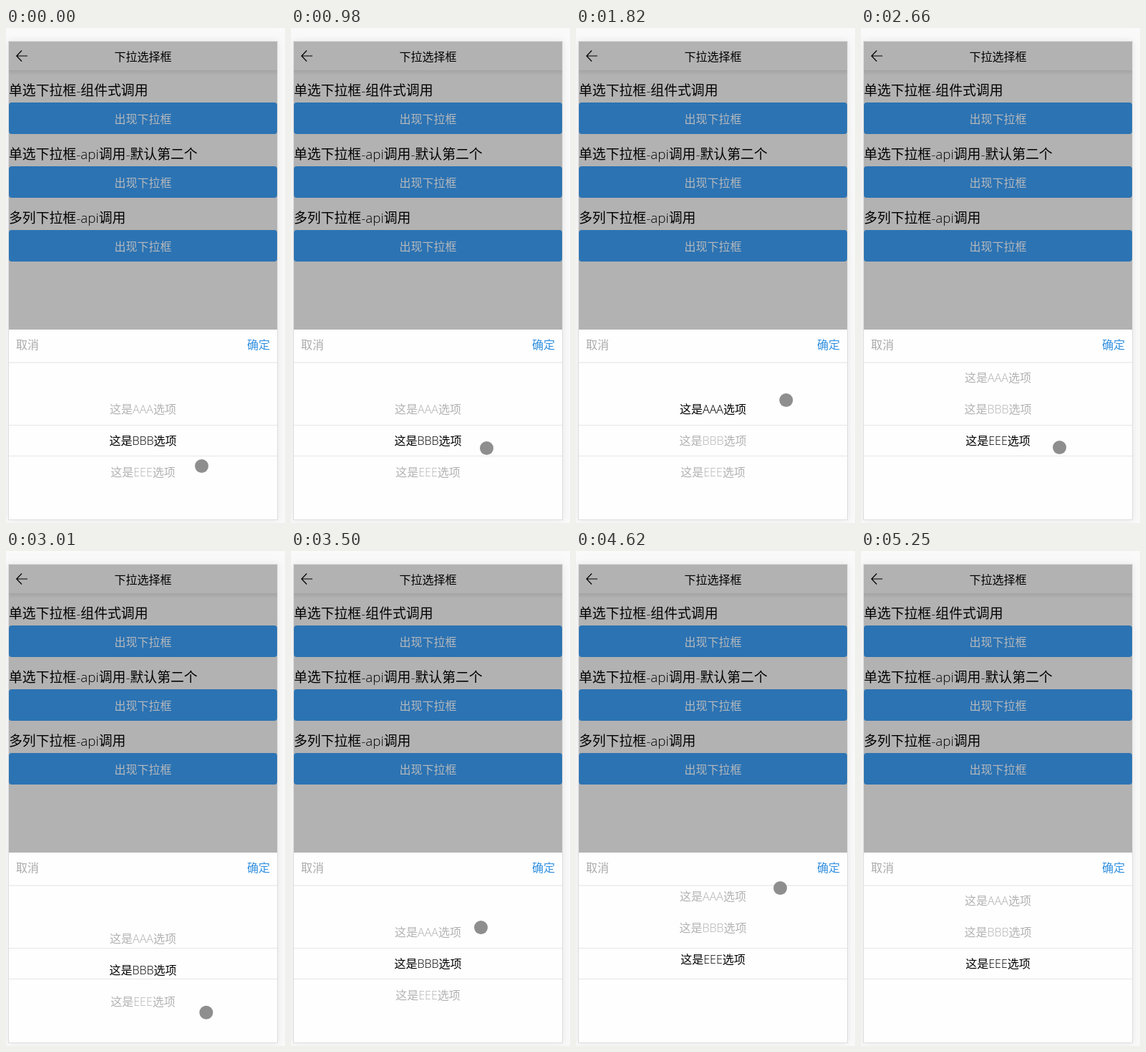
These frames come from a looping animation (390 by 691 pixels, 5.67 s). An HTML page with a canvas:

```html
<!DOCTYPE html>
<html lang="zh-CN">
<head>
<meta charset="utf-8">
<title>下拉选择框</title>
<style>
html, body { margin: 0; width: 100%; height: 100%; overflow: hidden; background: #fafafa; }
canvas { display: block; width: 390px; height: 691px; }
</style>
</head>
<body>
<canvas id="stage"></canvas>
<script>
const W = 390, H = 691, LOOP = 5670, STEP = 70;
const ROW = 44, MID = 576, PULL = 280, SNAP = 210, LEAVE = 5250;
const FONT = '"Open Sans", "Noto Sans CJK SC", "Noto Sans CJK", sans-serif';

const canvas = document.getElementById('stage');
const ctx = canvas.getContext('2d');
const dpr = window.devicePixelRatio || 1;
canvas.width = W * dpr;
canvas.height = H * dpr;
ctx.scale(dpr, dpr);

const options = ['这是AAA选项', '这是BBB选项', '这是EEE选项'];

// Each drag pulls the list for PULL ms; on release it snaps to an option
const drags = [
  { at: 980, from: [273.5, 586.5], to: [283, 642], pick: 0 },
  { at: 1698, from: [290.5, 563.5], to: [298.5, 454.5], pick: 2 },
  { at: 2660, from: [277.5, 585.5], to: [280.5, 649.5], pick: 1 },
  { at: 3500, from: [265.5, 525.5], to: [270, 575.5], pick: 0 },
  { at: 4270, from: [273.5, 571.5], to: [285.5, 470.5], pick: 2 }
];

// The pointer glides between drags, hovering before the first
const path = [
  { t: 0, p: [273.5, 611.5] },
  { t: 280, p: [273.5, 598.5] },
  { t: 560, p: [273.5, 598.5] },
  ...drags.flatMap(d => [{ t: d.at, p: d.from }, { t: d.at + PULL, p: d.to }]),
  { t: 4620, p: [285.5, 470.5] },
  { t: 4830, p: [311.5, 611.5] },
  { t: LEAVE, p: [341.5, 675.5] }
];

const lerp = (a, b, k) => a + (b - a) * k;
const smooth = k => k * k * (3 - 2 * k);
const easeOut = k => 1 - (1 - k) * (1 - k);
const restOf = pick => (1 - pick) * ROW;

function pointer(t) {
  const i = path.findIndex(s => s.t > t);
  const a = path[i - 1], b = path[i];
  const k = smooth((t - a.t) / (b.t - a.t));
  return a.p.map((v, j) => lerp(v, b.p[j], k));
}

function picker(t) {
  let pick = 1, offset = 0;
  for (const d of drags) {
    if (t < d.at) break;
    const release = d.at + PULL;
    offset = restOf(pick) + pointer(Math.min(t, release))[1] - d.from[1];
    if (t < release) break;
    pick = d.pick;
    offset = lerp(offset, restOf(pick), easeOut(Math.min(1, (t - release) / SNAP)));
  }
  return { pick, offset };
}

function rect(x, y, w, h, color) {
  ctx.fillStyle = color;
  ctx.fillRect(x, y, w, h);
}

function text(str, x, cy, color, align = 'left', size = 16) {
  ctx.font = `350 ${size}px ${FONT}`;
  ctx.textAlign = align;
  ctx.fillStyle = color;
  ctx.fillText(str, x, cy + Math.round(size * 0.37));
}

function fade(x, y, w, h, alpha) {
  const g = ctx.createLinearGradient(0, y, 0, y + h);
  g.addColorStop(0, `rgba(0,0,0,${alpha})`);
  g.addColorStop(1, 'rgba(0,0,0,0)');
  rect(x, y, w, h, g);
}

function button(title, y) {
  text(title, 4, y - 17, '#000', 'left', 18.85);
  ctx.fillStyle = '#2c73b3';
  ctx.beginPath();
  ctx.roundRect(4, y, 375, 44, 4);
  ctx.fill();
  text('出现下拉框', 191.5, y + 23, '#b6b9bc', 'center');
}

function backArrow() {
  ctx.strokeStyle = '#000';
  ctx.lineWidth = 1.2;
  ctx.beginPath();
  ctx.moveTo(22, 31.5);
  ctx.lineTo(14.8, 39);
  ctx.lineTo(22, 46.5);
  ctx.moveTo(14.8, 39);
  ctx.lineTo(30, 39);
  ctx.stroke();
}

function page() {
  rect(0, 0, W, H, '#fafafa');
  ctx.save();
  ctx.shadowColor = 'rgba(0,0,0,.08)';
  ctx.shadowBlur = 10 * dpr;
  rect(3, 18, 377, 669, '#dedede');
  ctx.restore();
  rect(4, 19, 375, 667, '#b2b2b2');
  fade(4, 59, 375, 7, 0.08);
  backArrow();
  text('下拉选择框', 191.5, 40, '#000', 'center');
  button('单选下拉框-组件式调用', 104);
  button('单选下拉框-api调用-默认第二个', 193);
  button('多列下拉框-api调用', 282);
}

function sheet({ pick, offset }) {
  rect(4, 421, 375, 265, '#fefefe');
  text('取消', 14, 442, '#aaa');
  text('确定', 369, 442, '#3190e0', 'right');
  rect(4, 466, 375, 2, '#f0f0f0');
  ctx.save();
  ctx.beginPath();
  ctx.rect(4, 468, 375, 218);
  ctx.clip();
  options.forEach((label, i) => {
    const y = MID + (i - 1) * ROW + offset;
    text(label, 191.5, y, i === pick ? '#000' : '#b2b2b2', 'center');
  });
  ctx.restore();
  rect(4, 554, 375, 1, '#e6e6e6');
  rect(4, 597, 375, 1, '#e6e6e6');
}

function dot([x, y]) {
  ctx.fillStyle = 'rgba(130,130,130,.9)';
  ctx.beginPath();
  ctx.arc(x, y, 9.5, 0, Math.PI * 2);
  ctx.fill();
}

const start = performance.now();
function frame(now) {
  const elapsed = Math.max(0, now - start) % LOOP;
  const t = Math.floor(elapsed / STEP) * STEP;
  page();
  sheet(picker(t));
  if (t < LEAVE) dot(pointer(t));
  requestAnimationFrame(frame);
}
frame(start);
</script>
</body>
</html>
```
